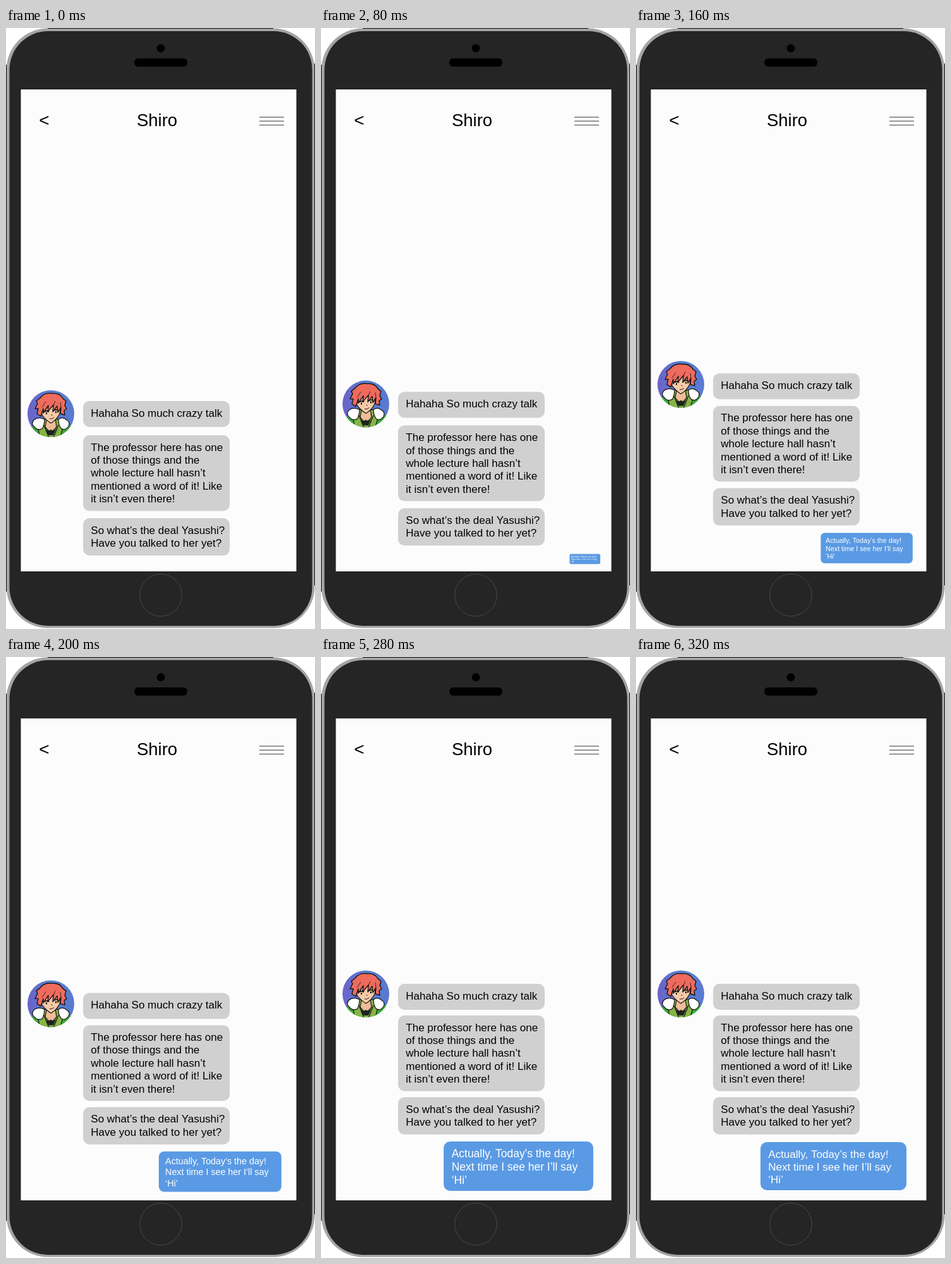
Animation of 489 by 949 pixels, one loop 0.8 s. Source, as an HTML page with a canvas:

```html
<!DOCTYPE html>
<html lang="en">
<head>
<meta charset="utf-8">
<title>Chat</title>
<style>
  html, body { margin: 0; width: 100%; height: 100%; overflow: hidden; background: #fff; }
  canvas { display: block; width: 489px; height: 949px; }
</style>
</head>
<body>
<canvas id="stage"></canvas>
<script>
const W = 489, H = 949, LOOP = 800, STEP = 40, SLIDE = 5;
const FONT = '"Liberation Sans", Arial, sans-serif';
const canvas = document.getElementById('stage');
const ctx = canvas.getContext('2d');
const ratio = window.devicePixelRatio || 1;
canvas.width = Math.round(W * ratio);
canvas.height = Math.round(H * ratio);

// y is the resting place, rise the distance travelled to reach it
const received = [
  { y: 516, h: 41, rise: 73, lines: ['Hahaha So much crazy talk'] },
  { y: 566, h: 119.5, rise: 77, lines: [
    'The professor here has one', 'of those things and the', 'whole lecture hall hasn’t',
    'mentioned a word of it! Like', 'it isn’t even there!'] },
  { y: 695, h: 59, rise: 79, lines: ['So what’s the deal Yasushi?', 'Have you talked to her yet?'] }
];
const reply = ['Actually, Today’s the day!', 'Next time I see her I’ll say', '‘Hi’'];

function box(x, y, w, h, r, fill) {
  ctx.beginPath();
  ctx.roundRect(x, y, w, h, r);
  ctx.fillStyle = fill;
  ctx.fill();
}

function disc(x, y, r, fill) {
  ctx.beginPath();
  ctx.arc(x, y, r, 0, Math.PI * 2);
  ctx.fillStyle = fill;
  ctx.fill();
}

function text(str, x, y, size, fill, align = 'left') {
  ctx.font = `${size}px ${FONT}`;
  ctx.textAlign = align;
  ctx.fillStyle = fill;
  ctx.fillText(str, x, y);
}

function bubble(x, y, w, h, lines, fill, ink) {
  box(x, y, w, h, 10, fill);
  lines.forEach((line, i) => text(line, x + 12.3, y + 24.5 + i * 20.4, 17, ink));
}

function shape(d, fill, line = 1.2) {
  const path = new Path2D(d);
  if (fill) {
    ctx.fillStyle = fill;
    ctx.fill(path);
  }
  if (line) {
    ctx.lineWidth = line;
    ctx.strokeStyle = '#141414';
    ctx.stroke(path);
  }
}

function phone() {
  ctx.fillStyle = '#fff';
  ctx.fillRect(0, 0, W, H);
  box(0.5, 0.5, 488, 947, 66, '#a4a4a4');
  ctx.fillStyle = '#111';
  ctx.fillRect(66, 0, 357, 1);
  ctx.fillRect(0, 58, 1, 832);
  ctx.fillRect(488, 56, 1, 824);
  box(5.5, 5, 479, 939, 61, '#252525');

  disc(245, 32, 6.5, '#000');
  box(203, 48, 84, 13, 6, '#000');
  ctx.beginPath();
  ctx.arc(245, 895.5, 33.3, 0, Math.PI * 2);
  ctx.lineWidth = 1;
  ctx.strokeStyle = '#484848';
  ctx.stroke();

  ctx.fillStyle = '#fcfcfc';
  ctx.fillRect(23.5, 97, 436, 761);
  text('<', 52.2, 155, 28, '#000');
  text('Shiro', 239, 155, 27.5, '#000', 'center');
  ctx.fillStyle = '#777';
  for (const y of [140, 146.3, 152.6]) ctx.fillRect(401, y, 39, 1.5);
}

function avatar(y) {
  ctx.save();
  ctx.translate(71, y);
  ctx.beginPath();
  ctx.arc(0, 0, 37, 0, Math.PI * 2);
  ctx.clip();
  const sky = ctx.createLinearGradient(-37, 0, 37, 0);
  sky.addColorStop(0, '#6c62c8');
  sky.addColorStop(0.5, '#5680d2');
  sky.addColorStop(1, '#5a78d0');
  ctx.fillStyle = sky;
  ctx.fillRect(-38, -38, 76, 76);
  ctx.lineJoin = 'round';

  // jacket, fur collar, neck
  shape('M-38 24 L-14 14 L16 14 L38 20 V40 H-38 Z', '#3cab36', 0);
  shape('M-17 40 L-20 24 L-11 9 L12 9 L19 22 L14 40 Z', '#86b446');
  shape('M-10 9 Q-20 4 -27 10 Q-32 16 -26 21 Q-20 28 -13 23 Q-10 16 -10 9 Z', '#fff');
  shape('M12 9 Q19 4 25 10 Q31 13 28 20 Q22 28 16 23 Q12 18 12 9 Z', '#fff');
  shape('M-7 10 L-9 21 L0 31 L9 21 L7 8 Z', '#efbd98');
  shape('M-9 24 Q-4 29 0 25 Q5 29 9 23 L4 34 H-4 Z', '#1c2420', 0);
  shape('M-11 18 L-3 38 M12 18 L4 38', null);

  // face
  shape('M-16 -16 L-14 2 Q-8 10 0 15 Q9 10 14 0 L16 -16 Z', '#f7caa6');
  shape('M-10 -3 Q-6 -6 -3 -3 M5 -5 Q9 -8 12 -5', null, 1.8);
  shape('M-7 -2 V1 M8 -4 V-1', null, 2);
  shape('M-2 8 Q2 9 5 6 M1 1 L2 3', null, 1);

  // hair
  shape('M-22 0 L-20 -8 L-25 -8 L-21 -16 L-23 -20 L-17 -25 Q-10 -34 2 -32 ' +
        'Q14 -33 19 -24 L24 -20 L22 -13 L25 -8 L21 -5 L22 2 L15 0 L16 -10 ' +
        'L11 -2 L10 -12 L3 -3 L4 -14 L-5 -3 L-4 -13 L-12 -1 L-12 -8 L-16 4 Z', '#ee6b5d', 1.4);
  shape('M-8 -19 L-14 -10 M7 -20 L4 -13 M15 -18 L16 -10', null, 0.8);
  ctx.restore();
}

function draw(time) {
  const tick = Math.max(0, Math.min(7, Math.floor((time % LOOP) / STEP) - 1));
  const slide = Math.min(tick, SLIDE) / SLIDE;
  ctx.setTransform(ratio, 0, 0, ratio, 0, 0);
  phone();
  avatar(532 + 77 * (1 - slide));
  for (const { y, h, rise, lines } of received) {
    bubble(122, y + rise * (1 - slide), 232, h, lines, '#d0d0d0', '#000');
  }
  if (!tick) return;

  // reply grows from the lower right, overshoots, then settles
  const scale = tick <= SLIDE ? 1.05 * slide : 1.05 - 0.025 * (tick - SLIDE);
  ctx.translate(312.5 + 131.5 * (1 - slide), 804 + 43 * (1 - slide));
  ctx.scale(scale, scale);
  bubble(-115.5, -38, 231, 76, reply, '#5a9ae4', '#fff');
}

const start = performance.now();
function loop() {
  draw(performance.now() - start);
  requestAnimationFrame(loop);
}
loop();
</script>
</body>
</html>
```
